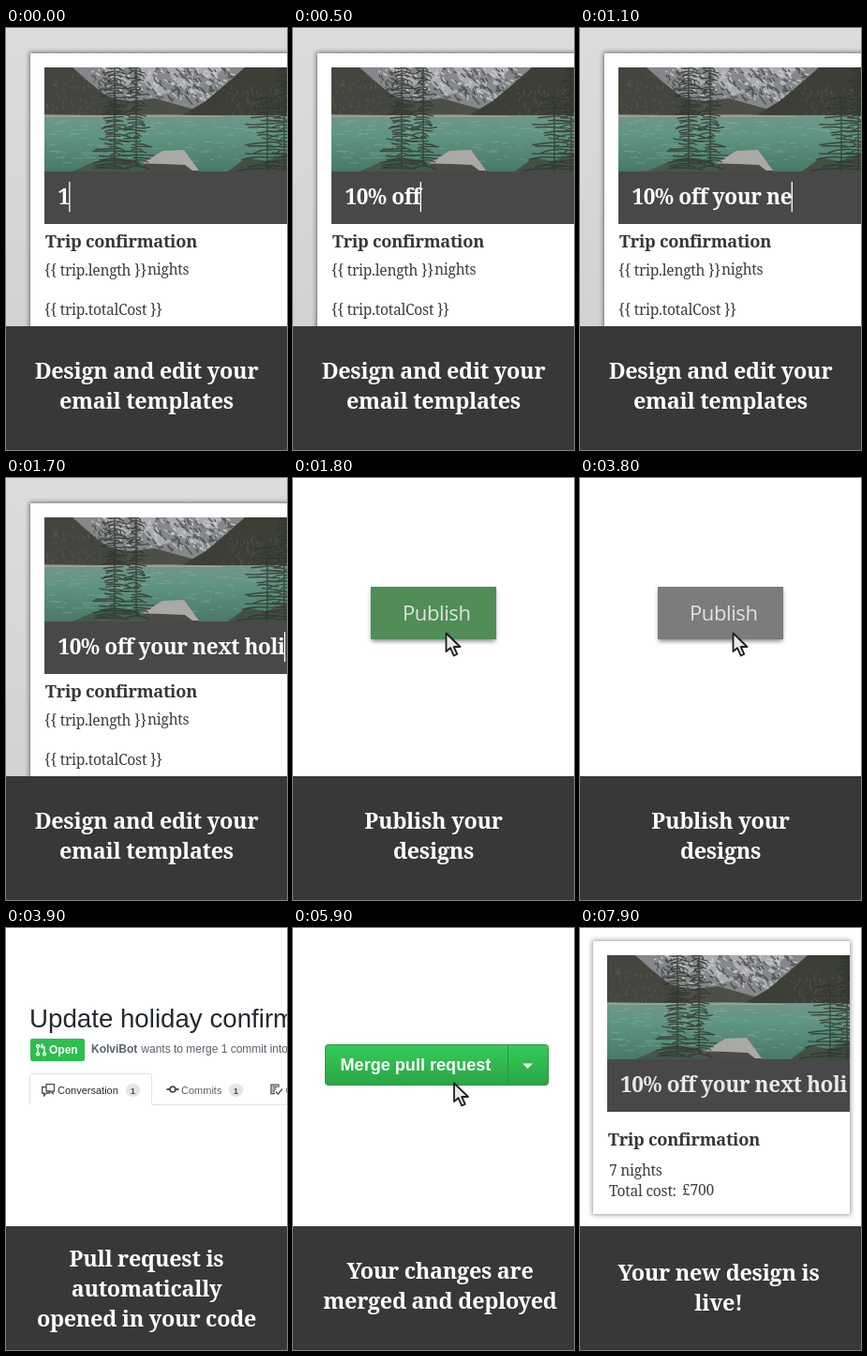
An HTML page that plays this animation: 300x450 px, repeating every 9900 ms.

```html
<!DOCTYPE html>
<html lang="en">
<head>
<meta charset="utf-8">
<title>Email template workflow</title>
<style>
  html, body { margin: 0; width: 100%; height: 100%; overflow: hidden; background: #fff; }
  #stage { position: relative; width: 300px; height: 450px; overflow: hidden; }
  #reel { display: block; animation: reel 9900ms step-end infinite; }
  #publish { animation: press 9900ms step-end infinite; }

  /* cuts at 1800, 3900, 5900 and 7900 ms */
  @keyframes reel {
    0% { transform: none; }
    18.1818% { transform: translateY(-450px); }
    39.3939% { transform: translateY(-900px); }
    59.5959% { transform: translateY(-1350px); }
    79.7979% { transform: translateY(-1800px); }
  }
  @keyframes press {
    0% { fill: #508d57; }
    38.3838% { fill: #7c7c7c; }
  }

  text { white-space: pre; font-family: "Liberation Sans", Arial, sans-serif; }
  .title, .head, .banner, .body { font-family: "Noto Serif", serif; }
  .title { font-size: 23.4px; font-weight: 700; letter-spacing: -.3px; fill: #fff; text-anchor: middle; }
  .banner { font-size: 22.6px; font-weight: 700; letter-spacing: -.45px; }
  .head { font-size: 18.2px; font-weight: 700; letter-spacing: -.25px; fill: #3a3536; }
  .body { font-size: 15.6px; letter-spacing: -.25px; fill: #3f3d3d; }
  .publish { font: 22px "Open Sans", "Noto Sans", sans-serif; letter-spacing: -.4px; fill: #e0e4e0; }
  .small { font-size: 12px; fill: #586069; }
  .tab { font-size: 11px; fill: #586069; }
  .bold { font-weight: 700; }
  .count { font-size: 9.5px; font-weight: 700; fill: #444d56; text-anchor: middle; }
  .icon { fill: none; stroke: #444d56; stroke-width: 1.3; }
</style>
</head>
<body>
<div id="stage">
<svg id="reel" width="300" height="2250" viewBox="0 0 300 2250">
  <defs>
    <linearGradient id="wall" x2="0" y2="1">
      <stop stop-color="#dcdcdc"/><stop offset="1" stop-color="#d2d2d2"/>
    </linearGradient>
    <linearGradient id="lake" x2="0" y2="1">
      <stop stop-color="#71968a"/><stop offset=".35" stop-color="#5f9583"/><stop offset="1" stop-color="#4a7868"/>
    </linearGradient>
    <linearGradient id="merge" x2="0" y2="1">
      <stop stop-color="#36cb57"/><stop offset="1" stop-color="#2aa546"/>
    </linearGradient>
    <filter id="blur" x="-20%" y="-20%" width="140%" height="140%"><feGaussianBlur stdDeviation="2.5"/></filter>
    <clipPath id="frame"><path d="M0 0H259V111H0z"/></clipPath>
    <clipPath id="card"><path d="M14 14H288V305H14z"/></clipPath>

    <g id="photo" clip-path="url(#frame)">
      <path fill="#85878a" d="M0 0H259V60H0z"/>
      <path fill="#a9abae" d="M62 0H86L80 9 94 15 84 22 70 12zM96 0H120L114 10 124 20 138 26 120 30 106 16zM130 0H150L142 8 158 18 168 28 150 24 136 12zM160 0H192L180 12 168 10z"/>
      <path id="snow" stroke="#d3d5d8" stroke-width="1.4" opacity=".8"/>
      <path id="rock" stroke="#45474a" stroke-width="1.5" opacity=".8"/>
      <path fill="#4b4f45" d="M40 50 66 32 92 36 118 33 150 42 180 50V56H40z"/>
      <path fill="#43463e" d="M0 0H30L48 16 68 32 92 52H0z"/>
      <path fill="#3c3f35" d="M142 54 172 36 196 16 214 0H259V58H142z"/>
      <path id="forest" stroke="#5b5f55" stroke-width="1.2" opacity=".6"/>
      <path fill="url(#lake)" d="M0 51H259V111H0z"/>
      <path id="ripples" stroke="#9dbbad" stroke-width=".8" opacity=".5"/>
      <path fill="#aaa998" d="M0 50 60 51 130 50 190 52V53H0z" opacity=".6"/>
      <path fill="#414a41" d="M30 111 48 103 72 96 100 99 112 111z" opacity=".7"/>
      <path fill="#4b4a46" d="M105 103 150 103 165 111H108z"/>
      <path fill="#aba9a5" d="M105 102 126 89 149 88 165 110 158 110 150 104z"/>
      <path fill="#3f4237" d="M196 111 216 96 236 100 259 92V111z" opacity=".75"/>
      <path id="trees" fill="none" stroke="#30352c" stroke-width="1.4" opacity=".8"/>
    </g>

    <path id="pointer" fill="#e9e9e9" stroke="#1c1c1c" stroke-width="1.8" stroke-linejoin="round"
      d="M.5.5V20L5 16.200 8.700 24.500 12.300 22.800 8.700 15H15.500z"/>
    <g id="count"><rect width="15" height="14" rx="7" fill="#e4e5e7"/><text class="count" x="7.500" y="10.500">1</text></g>
    <path id="bar" fill="#383838" d="M0 318H300V450H0z"/>
  </defs>

  <g>
    <path fill="url(#wall)" d="M0 0H300V318H0z"/>
    <path filter="url(#blur)" opacity=".5" d="M25 26H320V330H25z"/>
    <path fill="#fff" d="M26 27H300V318H26z"/>
    <use href="#photo" x="41" y="42"/>
    <path fill="#484848" d="M41 153H300V209H41z"/>
    <text id="typed" class="banner" x="55.500" y="188" fill="#fff">1</text>
    <path id="caret" fill="#fff" d="M0 164H1.300V196H0z"/>
    <text class="head" x="42" y="234">Trip confirmation</text>
    <text class="body" x="41" y="264">{{ trip.length }}</text>
    <text class="body" x="151" y="263">nights</text>
    <text class="body" x="41" y="306">{{ trip.totalCost }}</text>
    <use href="#bar"/>
    <text class="title" x="150" y="374">Design and edit your</text>
    <text class="title" x="150" y="406">email templates</text>
  </g>

  <g transform="translate(0 450)">
    <path fill="#fff" d="M0 0H300V450H0z"/>
    <path filter="url(#blur)" opacity=".5" d="M84 119H216V174H84z"/>
    <path id="publish" d="M83 116H217V172H83z"/>
    <text class="publish" x="117" y="152">Publish</text>
    <use href="#pointer" x="163" y="165"/>
    <use href="#bar"/>
    <text class="title" x="150" y="374">Publish your</text>
    <text class="title" x="150" y="406">designs</text>
  </g>

  <g transform="translate(0 900)">
    <path fill="#fff" d="M0 0H300V450H0z"/>
    <text x="25" y="105.500" font-size="27.700" fill="#24292e">Update holiday confirmation</text>
    <rect x="26" y="118" width="58" height="24" rx="2" fill="#2cbe4e"/>
    <g fill="none" stroke="#fff" stroke-width="1.300">
      <circle cx="34" cy="126" r="1.500"/><circle cx="34" cy="134.500" r="1.500"/><circle cx="41" cy="134.500" r="1.500"/>
      <path d="M34 127.500V133M41 133V128Q41 126 39 126H37.500M39.500 123.500 37 126 39.500 128.500"/>
    </g>
    <text class="small bold" x="46" y="134" style="fill:#fff">Open</text>
    <text class="small bold" x="91" y="133">KolviBot</text>
    <text class="small" x="144.300" y="133">wants to merge 1 commit into</text>
    <path fill="none" stroke="#dfe2e5" d="M25.500 188.500V157.500Q25.500 155.500 27.500 155.500H153.500Q155.500 155.500 155.500 157.500V188.500H300"/>
    <path class="icon" d="M43 166.600H51.500V174H50V176.500L47.500 174H43zM43 169.500H38.700V176H40.500V178.800L43.200 176H46.500V174"/>
    <text class="tab" x="55" y="176.500" style="fill:#24292e">Conversation</text>
    <use href="#count" x="128" y="166"/>
    <g class="icon" style="stroke-width:1.800"><circle cx="178" cy="172" r="2.900"/><path d="M171.500 172H175M181 172H184.500"/></g>
    <text class="tab" x="187" y="176.500">Commits</text>
    <use href="#count" x="238" y="166"/>
    <path class="icon" d="M291 170V167.200H283V176.500H287M284.500 169.500H289.500M284.500 171.800H288.500M284.500 174H287M288 174.500 290.500 177 295 171.500"/>
    <text class="tab" x="298.500" y="176.500">Checks</text>
    <use href="#bar"/>
    <text class="title" x="150" y="361">Pull request is</text>
    <text class="title" x="150" y="393">automatically</text>
    <text class="title" x="150" y="425">opened in your code</text>
  </g>

  <g transform="translate(0 1350)">
    <path fill="#fff" d="M0 0H300V450H0z"/>
    <rect x="34.500" y="124.500" width="238" height="43" rx="3" fill="url(#merge)" stroke="#2a9443"/>
    <path stroke="#2a9443" d="M229.500 125V167"/>
    <path fill="#fff" d="M245 144.500H256L250.500 150z"/>
    <text class="bold" x="50.500" y="152" font-size="18.100" fill="#fff">Merge pull request</text>
    <use href="#pointer" x="171.500" y="165"/>
    <use href="#bar"/>
    <text class="title" x="157" y="374">Your changes are</text>
    <text class="title" x="157" y="406">merged and deployed</text>
  </g>

  <g transform="translate(0 1800)">
    <path fill="#fff" d="M0 0H300V450H0z"/>
    <path filter="url(#blur)" opacity=".4" d="M13 13H289V306H13z"/>
    <g clip-path="url(#card)">
      <path fill="#fff" d="M14 14H288V305H14z"/>
      <use href="#photo" x="29" y="29"/>
      <path fill="#484848" d="M29 140H288V196H29z"/>
      <text class="banner" x="43" y="175" fill="#e8e8e8">10% off your next holi</text>
    </g>
    <text class="head" x="30" y="232">Trip confirmation</text>
    <text class="body" x="31" y="264">7 nights</text>
    <text class="body" x="31" y="286">Total cost:</text>
    <text class="body" x="109" y="285">£700</text>
    <use href="#bar"/>
    <text class="title" x="148" y="376">Your new design is</text>
    <text class="title" x="148" y="408">live!</text>
  </g>
</svg>
</div>
<script>
  const $ = id => document.getElementById(id);
  const typed = $('typed'), caret = $('caret');
  const message = '10% off your next holiday';

  let seed = 7;
  const rand = () => (seed = seed * 16807 % 2147483647) / 2147483647;
  const draw = (id, d) => $(id).setAttribute('d', d);

  // short strokes scattered over a box
  function flecks(n, x, y, w, h, dx, dy) {
    let d = '';
    while (n--) d += `M${x + w * rand()} ${y + h * rand()}l${dx * rand()} ${dy * rand()}`;
    return d;
  }

  // trunk with drooping branches that widen towards the ground
  function tree(x, top, bottom, spread, gap) {
    let d = `M${x} ${top}V${bottom}`;
    for (let y = top; y < bottom; y += gap) {
      const reach = spread * (.35 + .65 * (y - top) / (bottom - top));
      for (const side of [-1, 1]) {
        const w = side * reach * (.15 + .85 * rand());
        d += `M${x} ${y}q${w / 2} ${rand() * 4 - 2} ${w} ${rand() * 5 - 1}`;
      }
    }
    return d;
  }

  draw('snow', flecks(130, 50, 0, 150, 34, 6, 4));
  draw('rock', flecks(150, 50, 0, 150, 36, 5, 6));
  draw('forest', flecks(90, 0, 8, 60, 42, 1, 4) + flecks(100, 190, 18, 70, 36, 1, 4));
  draw('ripples', flecks(110, 0, 56, 250, 46, 14, 0));
  draw('trees', tree(75, -12, 108, 26, 2.6) + tree(98, -20, 106, 21, 2.9) +
    tree(238, 32, 111, 42, 4) + tree(256, 0, 111, 26, 3.4));

  let start;
  function type(now) {
    start ??= now;
    const step = Math.floor((now - start) % 9900 / 100);
    const text = message.slice(0, 1 + Math.floor(step * 14 / 11));
    if (typed.textContent !== text) typed.textContent = text;
    caret.setAttribute('transform', `translate(${55 + typed.getComputedTextLength()})`);
    requestAnimationFrame(type);
  }
  requestAnimationFrame(type);
</script>
</body>
</html>
```
